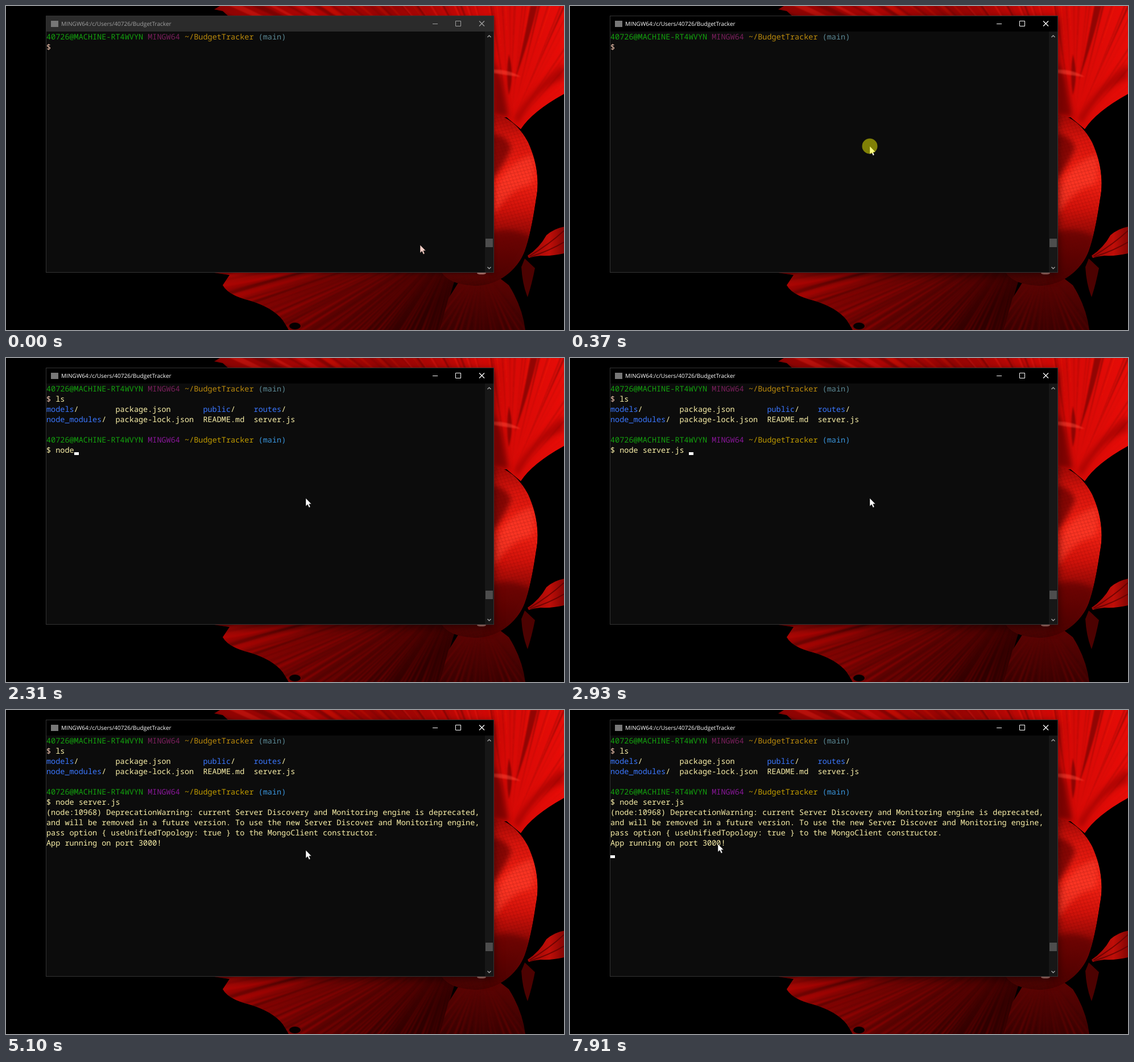
An HTML page for the animation above (7990 ms loop, 981 by 571 pixels).

```html
<!DOCTYPE html>
<html lang="en">
<head>
<meta charset="utf-8">
<title>Terminal session</title>
<style>
  html, body { margin: 0; width: 100%; height: 100%; overflow: hidden; background: #000; }
  #stage { position: relative; width: 981px; height: 571px; overflow: hidden; text-rendering: geometricPrecision; }
  #stage > svg { position: absolute; left: 0; top: 0; }
  #win {
    position: absolute; left: 70px; top: 17px; width: 786px; height: 451px;
    border: 1px solid #333; background: #0c0c0c; box-shadow: 0 2px 6px rgba(0, 0, 0, .35);
  }
  #win.active { box-shadow: 0 4px 14px rgba(0, 0, 0, .55); }
  #bar { position: absolute; left: 0; top: 0; width: 786px; height: 27px; background: #2b2b2b; color: #a0a0a0; }
  .active #bar { background: #000; color: #fff; }
  #icon { position: absolute; left: 8px; top: 8px; width: 13px; height: 11px; background: #777; }
  #title { position: absolute; left: 26px; top: 0; font: 10.1px/27px "Open Sans", "Noto Sans", sans-serif; white-space: pre; }
  #bar svg, #scroll svg { position: absolute; left: 0; top: 0; }
  #scroll { position: absolute; left: 771px; top: 27px; width: 15px; height: 424px; background: #171717; }
  #thumb { position: absolute; left: 1px; top: 365px; width: 13px; height: 15px; background: #4d4d4d; }
  #term { position: absolute; left: 71px; top: 45px; font: 13.5px/18px "Noto Sans Mono", "DejaVu Sans Mono", monospace; color: #faf0a9; }
  .row { position: absolute; left: 0; height: 18px; white-space: pre; font-variant-ligatures: none; }
  #caret { position: absolute; width: 8px; height: 5px; background: #fff; }
  .user { color: #13a10e; } .sys { color: #881798; } .path { color: #c19c00; }
  .branch { color: #3a96dd; } .dir { color: #3b78ff; }
  .first .sys { color: #7a1f5c; } .first .path { color: #bd8c0c; } .first .branch { color: #5c8a96; }
  .pink { color: #f0c4ae; }
</style>
</head>
<body>
<div id="stage">
  <svg width="981" height="571" viewBox="0 0 981 571">
    <defs>
      <linearGradient id="topFill">
        <stop offset="0" stop-color="#8c0302"/><stop offset=".3" stop-color="#b00403"/>
        <stop offset=".5" stop-color="#940302"/><stop offset=".75" stop-color="#cc0805"/>
        <stop offset="1" stop-color="#e60c07"/>
      </linearGradient>
      <linearGradient id="lowFill" x2="1" y2=".3">
        <stop offset="0" stop-color="#b80804"/><stop offset=".3" stop-color="#880402"/>
        <stop offset=".65" stop-color="#5c0201"/><stop offset="1" stop-color="#300000"/>
      </linearGradient>
      <linearGradient id="bodyFill" x2="0" y2="1">
        <stop offset="0" stop-color="#a00805"/><stop offset=".15" stop-color="#d8140c"/>
        <stop offset=".38" stop-color="#f42214"/><stop offset=".55" stop-color="#d2120a"/>
        <stop offset=".72" stop-color="#8c0704"/><stop offset="1" stop-color="#420201"/>
      </linearGradient>
      <linearGradient id="tailFill">
        <stop offset="0" stop-color="#980604"/><stop offset=".6" stop-color="#c00e08"/><stop offset="1" stop-color="#840503"/>
      </linearGradient>
      <linearGradient id="hangFill" x2="0" y2="1">
        <stop offset="0" stop-color="#5c0302"/><stop offset="1" stop-color="#3c0101"/>
      </linearGradient>
      <pattern id="scales" width="9" height="8" patternUnits="userSpaceOnUse" patternTransform="rotate(28)">
        <path d="M0 0Q4.5 8 9 0M-4.5 4Q0 12 4.5 4Q9 12 13.5 4" fill="none" stroke="#5a0000" stroke-opacity=".22"/>
      </pattern>
      <filter id="soft"><feGaussianBlur stdDeviation="1.2"/></filter>
      <filter id="haze" x="-40%" y="-40%" width="180%" height="180%"><feGaussianBlur stdDeviation="5"/></filter>
      <clipPath id="topClip"><path id="topFin" d="M376 0L366 6L381 9L390 17L840 200L880 196L905 217Q925 186 981 155V0Z"/></clipPath>
      <clipPath id="lowClip"><path id="lowFin" d="M366 470L393 474L381 492Q391 510 428 519Q468 531 486 553Q492 562 497 571H762L790 480L770 460H366Z"/></clipPath>
      <clipPath id="hangClip"><path id="hangFin" d="M800 480L778 515L762 571H913Q908 530 884 492L866 478Z"/></clipPath>
      <clipPath id="bodyClip"><path id="trunk" d="M840 190L868 193C885 198 905 215 918 240C934 275 938 310 932 340C926 380 920 410 912 432C900 465 865 492 830 493C800 493 775 486 765 468Z"/></clipPath>
    </defs>
    <use href="#topFin" fill="url(#topFill)"/>
    <g clip-path="url(#topClip)">
      <g id="topRays" filter="url(#soft)"></g>
      <path d="M857 95L872 130L884 196L857 192Z" fill="#500100" opacity=".6" filter="url(#haze)"/>
      <path d="M884 85Q894 120 884 157Q878 120 884 85ZM934 0Q920 60 895 130Q912 55 922 0Z" fill="#4a0000" opacity=".5" filter="url(#soft)"/>
      <path d="M981 128Q930 148 900 208L893 198Q925 145 981 100Z" fill="#8c0402" opacity=".6" filter="url(#haze)"/>
      <path d="M857 112Q885 112 905 125Q880 122 857 118Z" fill="#ff4a38" opacity=".5" filter="url(#soft)"/>
    </g>
    <use href="#lowFin" fill="url(#lowFill)"/>
    <g clip-path="url(#lowClip)"><g id="lowRays" filter="url(#soft)"></g></g>
    <ellipse cx="508" cy="564" rx="11" ry="7" fill="#050000" stroke="#6a0302" stroke-width="2"/>
    <use href="#hangFin" fill="url(#hangFill)"/>
    <g clip-path="url(#hangClip)"><g id="hangRays" filter="url(#soft)"></g></g>
    <path d="M912 445L930 462Q924 492 917 513Q908 492 906 460Z" fill="#4c0201"/>
    <path d="M917 440Q938 426 950 404Q964 392 981 389V436Q960 441 940 440Q928 441 919 444Z" fill="url(#tailFill)"/>
    <path d="M920 441Q955 420 981 396M922 442Q958 430 981 416" stroke="#560100" stroke-width="2" fill="none" opacity=".7"/>
    <g clip-path="url(#bodyClip)">
      <use href="#trunk" fill="url(#bodyFill)"/>
      <g filter="url(#haze)">
        <path d="M850 225Q880 225 888 250Q872 290 850 310Z" fill="#600100" opacity=".7"/>
        <path d="M859 325Q880 276 926 262Q933 292 922 315Q890 318 857 368Z" fill="#ff4030" opacity=".6"/>
        <path d="M850 400Q890 385 925 410Q900 475 850 495Z" fill="#4a0000" opacity=".5"/>
      </g>
      <use href="#trunk" fill="url(#scales)"/>
      <ellipse cx="836" cy="471" rx="8" ry="2" fill="#c08078"/>
    </g>
  </svg>

  <div id="win">
    <div id="bar">
      <div id="icon"></div>
      <div id="title">MINGW64:/c/Users/40726/BudgetTracker</div>
      <svg width="786" height="27" fill="none" stroke="currentColor">
        <path d="M679 13.5H688M719.5 8.5H728.5V17.5H719.5Z"/>
        <path d="M761 8.5L770 17.5M770 8.5L761 17.5" stroke-width="1.3"/>
      </svg>
    </div>
    <div id="scroll">
      <div id="thumb"></div>
      <svg width="15" height="424" fill="none" stroke="#a0a0a0" stroke-width="1.4">
        <path d="M4.5 10L7.5 7L10.5 10M4.5 415L7.5 418L10.5 415"/>
      </svg>
    </div>
  </div>

  <div id="term"><div id="caret"></div></div>

  <svg width="981" height="571">
    <g id="mouse">
      <path id="arrow" d="M0 0V14.2L3.3 11.2L5.7 16.6L8.1 15.5L5.8 10.3H10Z" stroke="#000" stroke-width=".5"/>
      <circle id="click" r="13.5" fill="#ff0" fill-opacity=".48"/>
    </g>
  </svg>
</div>
<script>
const LOOP = 7990, CELL = 8.1, LINE = 18, STEP = 75, FOCUS = 370;
const $ = id => document.getElementById(id);

// Fin rays: thin wedges fanning out from a root, alternately dark and bright
let seed = 7;
const rand = () => (seed = seed * 16807 % 2147483647) / 2147483647;
function rays(id, cx, cy, from, to, count, reach, bright) {
  let out = '';
  for (let i = 0; i < count; i++) {
    const a = (from + (to - from) * (i + rand()) / count) * Math.PI / 180;
    const w = .004 + rand() * .012, bend = (rand() - .5) * .08;
    const at = (ang, r) => (cx + Math.cos(ang) * r).toFixed(1) + ' ' + (cy + Math.sin(ang) * r).toFixed(1);
    const d = `M${cx} ${cy}Q${at(a + bend, reach / 2)} ${at(a - w, reach)}L${at(a + w, reach)}Q${at(a + bend, reach / 2)} ${cx} ${cy}`;
    out += `<path d="${d}" fill="${i % 2 ? bright : '#2a0000'}" opacity="${(.12 + rand() * .28).toFixed(2)}"/>`;
  }
  $(id).innerHTML = out;
}
rays('topRays', 885, 220, -158, -32, 80, 600, '#ff2a1a');
rays('lowRays', 800, 400, 100, 172, 80, 520, '#c40a06');
rays('hangRays', 835, 460, 50, 130, 30, 150, '#a00604');

// Terminal rows, each shown from its own time on
const rows = [];
function addRow(row, at, html, cls = '') {
  const el = document.createElement('div');
  el.className = 'row ' + cls;
  el.style.top = row * LINE + 'px';
  el.innerHTML = html;
  $('term').append(el);
  rows.push({ el, at });
  return el;
}
const tag = (cls, text) => `<span class="${cls}">${text}</span>`;
const dir = (name, width) => tag('dir', name) + '/'.padEnd(width - name.length);
const prompt = [tag('user', '40726@MACHINE-RT4WVYN'), tag('sys', 'MINGW64'),
  tag('path', '~/BudgetTracker'), tag('branch', '(main)')].join(' ');

addRow(0, 0, prompt, 'first');
const list = addRow(1, 0, tag('pink', '$') + ' <span></span>').lastChild;
addRow(2, 1380, dir('models', 15) + 'package.json'.padEnd(19) + dir('public', 11) + dir('routes', 7));
addRow(3, 1380, dir('node_modules', 15) + 'package-lock.json'.padEnd(19) + 'README.md'.padEnd(11) + 'server.js');
addRow(5, 1530, prompt);
const run = addRow(6, 1530, '$ <span></span>').lastChild;
[
  '(node:10968) DeprecationWarning: current Server Discovery and Monitoring engine is deprecated,',
  'and will be removed in a future version. To use the new Server Discover and Monitoring engine,',
  'pass option { useUnifiedTopology: true } to the MongoClient constructor.',
  'App running on port 3000!'
].forEach((text, i) => addRow(7 + i, 4260, text));

const listKeys = [[1060, 'l'], [1230, 's']];
const runKeys = [[1930, 'n'], [2000, 'o'], [2080, 'd'], [2310, 'e'], [2390, ' '],
  [2540, 's'], [2620, 'e'], [2700, 'r'], [2930, 'ver.js ']];
const typed = (keys, t) => keys.filter(k => t >= k[0]).map(k => k[1]).join('');

// Caret row from each time on; -1 hides it
const caretRows = [[0, -1], [910, 1], [1300, 2], [1380, 4], [1530, 6], [3080, 7], [4090, -1], [4260, 11],
  [5100, -1], [5650, 11], [6200, -1], [6735, 11], [7285, -1], [7835, 11]];

// Pointer trips: start time, number of steps, target
const home = [728, 421];
const trips = [[70, 4, 527, 247], [6660, 4, 170, 207], [7060, 5, 217, 238], [7530, 6, 260, 236]];
const ease = p => p * p * (3 - 2 * p);
function pointer(t) {
  let [x, y] = home;
  for (const [start, steps, tx, ty] of trips) {
    if (t < start) break;
    const p = ease(Math.min(1, (Math.floor((t - start) / STEP) + 1) / steps));
    x += (tx - x) * p;
    y += (ty - y) * p;
  }
  return [x, y];
}

const show = (el, on) => { el.style.visibility = on ? 'visible' : 'hidden'; };

function draw(t) {
  $('win').classList.toggle('active', t >= FOCUS);
  rows.forEach(r => show(r.el, t >= r.at));
  list.textContent = typed(listKeys, t);
  run.textContent = typed(runKeys, t);

  const row = caretRows.filter(c => t >= c[0]).pop()[1];
  const line = { 1: list, 6: run }[row];
  const col = line ? 2 + line.textContent.length : 0;
  show($('caret'), row >= 0);
  $('caret').style.left = Math.round(col * CELL) + 'px';
  $('caret').style.top = row * LINE + 13 + 'px';

  const [x, y] = pointer(t);
  $('mouse').setAttribute('transform', `translate(${x.toFixed(1)} ${y.toFixed(1)})`);
  $('arrow').setAttribute('fill', t < FOCUS ? '#f6cfc6' : '#fff');
  show($('click'), t >= FOCUS && t < 450);
}

const begin = performance.now();
function tick() {
  draw((performance.now() - begin) % LOOP);
  requestAnimationFrame(tick);
}
draw(0);
tick();
</script>
</body>
</html>
```
